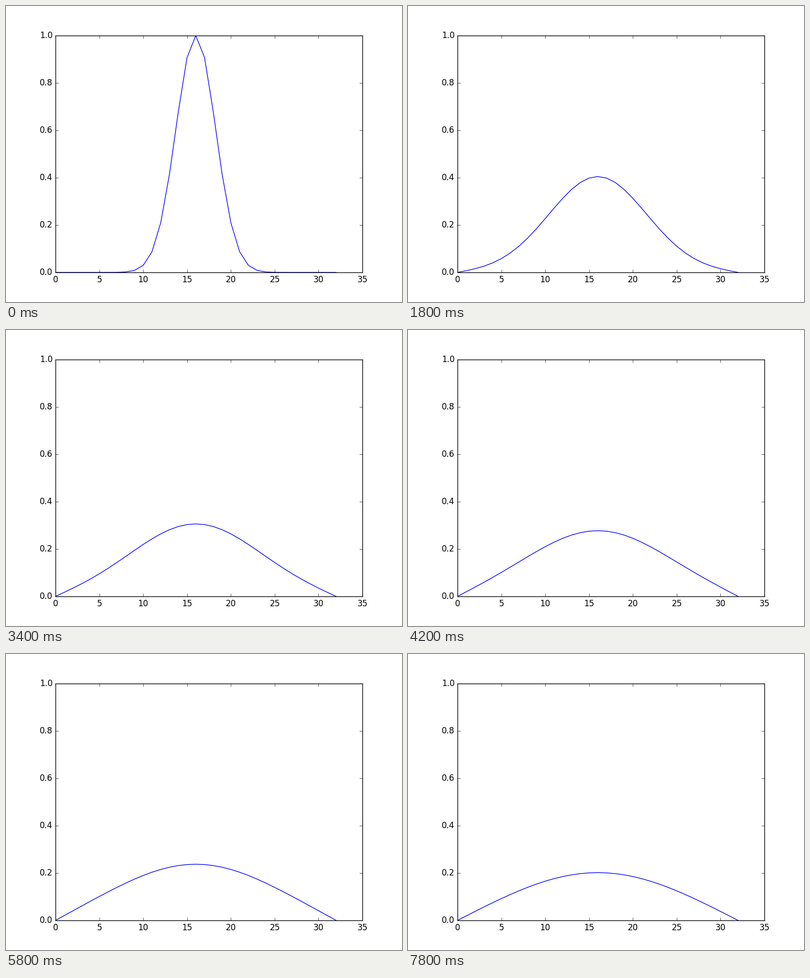
A matplotlib script for the animation above (8000 ms loop, 800 px wide and 600 px high).

```python
import numpy as np
import matplotlib.pyplot as plt
from matplotlib.animation import FuncAnimation

plt.style.use("classic")

CELLS = 32        # grid cells across the rod
RATE = 1.463      # diffusion number per frame
FRAMES = 40
INTERVAL = 200    # ms

nodes = np.arange(CELLS + 1)
start = np.exp(-100 * (nodes / CELLS - 0.5) ** 2)

# Sine modes of the discrete heat equation, both ends held at zero
k = np.arange(1, CELLS)
modes = np.sin(np.pi * np.outer(nodes, k) / CELLS)
coeffs = 2 / CELLS * (start @ modes)
decay = RATE * 4 * np.sin(np.pi * k / (2 * CELLS)) ** 2


def heat(step):
    return modes @ (coeffs * np.exp(-decay * step))


fig = plt.figure(figsize=(8, 6), dpi=100, facecolor="white")
ax = fig.add_axes([0.125, 0.1, 0.775, 0.8])
ax.set_xlim(0, 35)
ax.set_ylim(0, 1)
line, = ax.plot(nodes, start, color="blue", linewidth=1)


def update(frame):
    line.set_ydata(heat(frame))
    return line,


anim = FuncAnimation(fig, update, frames=FRAMES, interval=INTERVAL,
                     init_func=lambda: update(0), repeat=True,
                     repeat_delay=0, blit=False)

plt.show()
```
